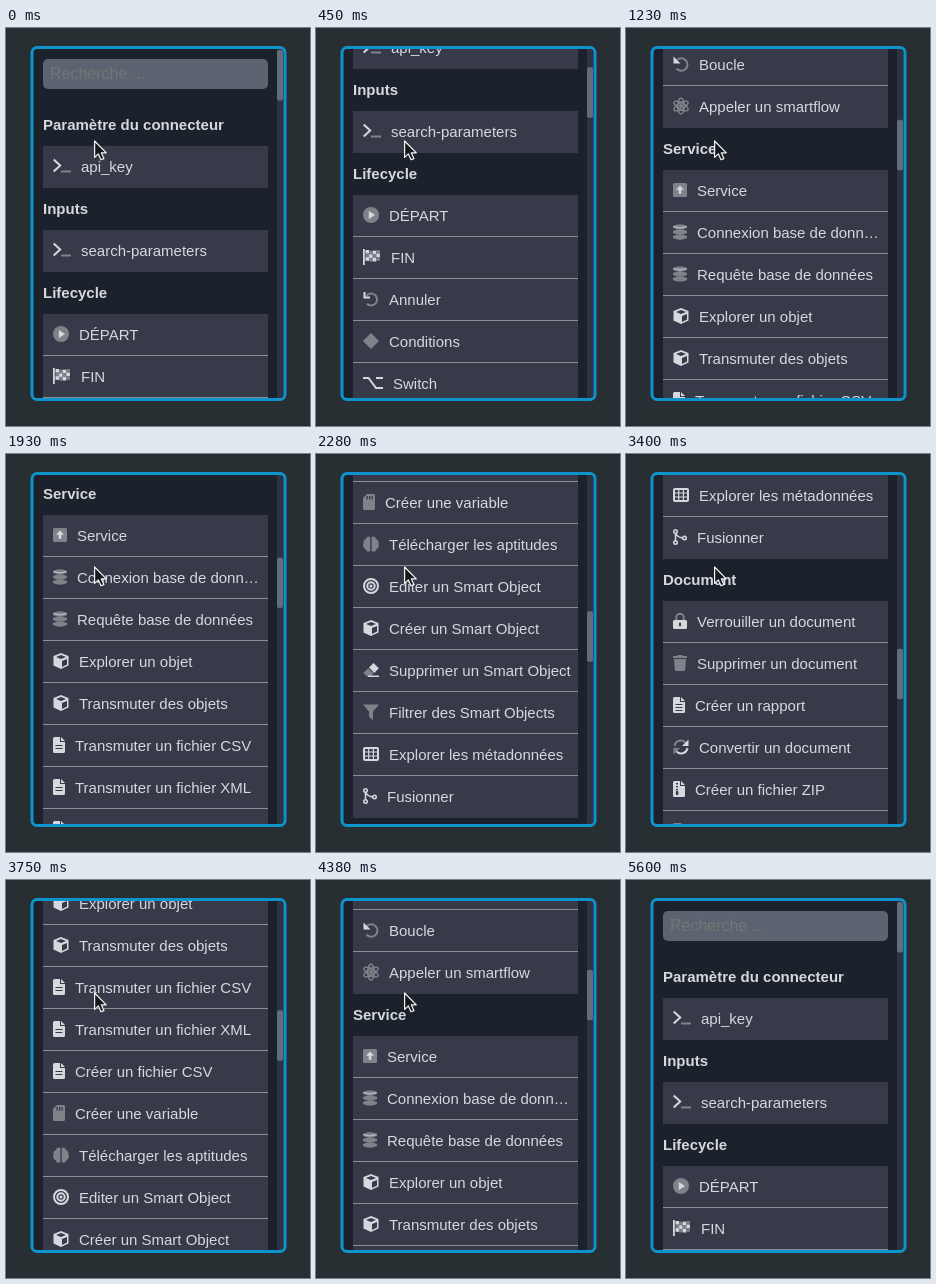
An HTML page for the animation above (6.81 s loop, 304x398 px).

```html
<!DOCTYPE html>
<html lang="fr">
<head>
<meta charset="utf-8">
<style>
html, body { margin: 0; width: 100%; height: 100%; overflow: hidden; background: #272f32; }
svg { display: block; width: 304px; height: 398px; }
text { font: 15px "Liberation Sans", Arial, sans-serif; fill: #d6d8dd; white-space: pre; }
.head { font-weight: bold; }
.hint { font-size: 16px; fill: #757575; }
.l { fill: #d6d8dd; }
.g { fill: #80828a; }
.d { fill: #383a49; }
.sl, .sg { fill: none; stroke: #d6d8dd; stroke-width: 2; }
.sg { stroke: #80828a; }
</style>
</head>
<body>
<svg viewBox="0 0 304 398">
  <defs><clipPath id="view"><rect x="28" y="21" width="249" height="349" rx="3"/></clipPath></defs>
  <rect width="304" height="398" fill="#272f32"/>
  <rect x="26" y="19.5" width="253" height="352" rx="5" fill="#1b222c"/>
  <g clip-path="url(#view)">
    <g id="list">
      <rect x="37" y="31" width="225" height="30" rx="5" fill="#5b6470"/>
      <text class="hint" x="44" y="51">Recherche ...</text>
      <rect id="caret" x="44" y="37" width="1" height="17" fill="#d6d8dd"/>
    </g>
    <rect x="271" y="21" width="6" height="349" fill="#2e3341"/>
    <rect id="thumb" x="271" y="22" width="6" height="50.5" rx="2" fill="#646c7b"/>
  </g>
  <rect x="26" y="19.5" width="253" height="352" rx="5" fill="none" stroke="#0f93cc" stroke-width="3"/>
  <path id="mouse" d="M88.6 113v16.4l3.8-3.5 2.6 5.9 2.9-1.2-2.6-5.8h5z" fill="#15181d" stroke="#f4f4f4" stroke-width="1.2" stroke-linejoin="round"/>
</svg>
<script>
const LOOP = 6810, PITCH = 42, TOP = 97;
const path = (cls, d, extra = '') => `<path class="${cls}" d="${d}" ${extra}/>`;
const circle = (cls, x, y, r) => `<circle class="${cls}" cx="${x}" cy="${y}" r="${r}"/>`;
const box = (cls, x, y, w, h, r = 0) => `<rect class="${cls}" x="${x}" y="${y}" width="${w}" height="${h}" rx="${r}"/>`;

const page = path('l', 'M1.5-8H7v5h5V6.500q0 1.500-1.500 1.500h-9Q0 8 0 6.500v-13Q0-8 1.500-8zM8-8l4 4H8z');
const checks = () => {
  let s = '';
  for (let i = 0; i < 12; i++) {
    const c = i % 4, r = (i / 4) | 0;
    s += box((c + r) % 2 ? 'g' : 'l', 2.5 + c * 3.6, -7 + r * 3.6 + (c % 3 ? 0.7 : 0), 3.6, 3.6);
  }
  return s;
};
const discs = () => [-5, 0, 5].map(y =>
  path('g', `M0 ${y - 1}q7-3.500 14 0v2q-7 3.500-14 0z`)).join('') + path('sl', 'M.5-5.500q6.500 3 13 0', 'style="stroke-width:.8"');
const orbits = () => [0, 60, 120].map(a =>
  `<ellipse class="sg" cx="8" rx="8" ry="3.2" style="stroke-width:1.5" transform="rotate(${a + 30} 8 0)"/>`).join('');

// Each icon is drawn from x = 0, centred on y = 0.
const icons = {
  prompt: path('sl', 'M.7-6.500l6.500 6-6.500 6') + path('sg', 'M8 5.500h10'),
  play: circle('g', 8, 0, 8) + path('l', 'M5.800-4L12 0 5.800 4z'),
  flag: box('l', 0, -8, 1.8, 16) + checks(),
  undo: path('sg', 'M3.500-3.500A6 6 0 1 1 4 4.800') + path('sl', 'M1.500-7v5.500H7'),
  diamond: path('g', 'M8-8l8 8-8 8-8-8z'),
  option: path('sl', 'M0-5h5.500l7.500 10h7M13-5h7'),
  loop: path('sg', 'M4-4A6.200 6.200 0 1 1 3.500 4.500') + path('l', 'M.5-7.500v7h7z'),
  atom: orbits() + circle('g', 8, 0, 2),
  up: box('g', 0, -7, 14, 14, 1.5) + path('l', 'M7-4.500l4 4.200H8.300v4H5.700v-4H3z'),
  base: discs(),
  cube: path('l', 'M8-8l7.500 3v9.500L8 8 .5 4.500V-5z') + path('d', 'M8-6l5 2-5 2-5-2zM9 0l5-2v5.500L9 6z'),
  csv: page + box('d', 2.5, 0, 7, 1) + box('d', 2.5, 3, 7, 1),
  card: path('g', 'M4-8h6.500Q12-8 12-6.500v13Q12 8 10.500 8h-9Q0 8 0 6.500V-4z') +
    [3.5, 6, 8.5].map(x => box('d', x, -6, 1.3, 3.5)).join(''),
  brain: path('g', 'M7.300-7v14Q4 9 2.800 5.500-1 3 .6-1 0-4 3-5 4-8.500 7.300-7zM8.700-7v14q3.300 2 4.500-1.500Q17 3 15.400-1 16-4 13-5 12-8.500 8.700-7z'),
  target: circle('sl', 8, 0, 7) + circle('sl', 8, 0, 3.7) + circle('l', 8, 0, 1.5),
  eraser: path('l', 'M6-2.500L10.500-7l5.300 5.300L11.300 3z') + path('g', 'M5.300-1.800l5.300 5.400L7.500 6.500H4L.3 2.800z') + box('l', 5, 5.5, 11, 1.5),
  funnel: path('g', 'M0-7.500h16L10-.5V8L6 5V-.5z'),
  grid: box('sl', 1, -6, 14, 12, 1) + path('sl', 'M1-2h14M1 2h14M5.700-6V6M10.400-6V6', 'style="stroke-width:1.2"'),
  merge: path('sl', 'M2.500-5V5M2.500-4q2 5 9 5', 'style="stroke-width:1.5"') +
    circle('l', 2.5, -5.5, 2.5) + circle('l', 2.5, 5.5, 2.5) + circle('l', 11.5, 1, 2.5) +
    circle('d', 2.5, -5.5, 1) + circle('d', 2.5, 5.5, 1) + circle('d', 11.5, 1, 1),
  lock: path('sg', 'M3.300-.5v-3a3.700 3.700 0 0 1 7.400 0v3') + box('l', 0, -1, 14, 9, 1.5) + box('d', 6, 1.5, 2, 4, 1),
  bin: path('g', 'M0-7h4l1-1h4l1 1h4v2H0zM1-4h12l-.8 10.500Q12 8 10.600 8H3.400Q2 8 1.800 6.500z'),
  report: page + [-1, 2, 5].map(y => box('d', 2.5, y, 7, 1)).join(''),
  sync: path('sg', 'M1.500-1A6.500 6.500 0 0 1 13-4') + path('sl', 'M14.500 1A6.500 6.500 0 0 1 3 4') +
    path('l', 'M15.500-7.500v6.500H9z') + path('g', 'M.5 7.500V1H7z'),
  zip: page + [-6, -3, 0].map(y => box('d', 3, y, 2, 1.4)).join('') + box('d', 2.8, 2, 2.6, 4, 1),
  sheet: path('g', 'M1.500-8H8l4 4V6.500Q12 8 10.500 8h-9Q0 8 0 6.500v-13Q0-8 1.500-8z')
};

// Headings are plain strings, items are [icon, label, text x].
const rows = [
  'Paramètre du connecteur', ['prompt', 'api_key', 75],
  'Inputs', ['prompt', 'search-parameters', 75],
  'Lifecycle', ['play', 'DÉPART', 73], ['flag', 'FIN', 75], ['undo', 'Annuler', 73],
  ['diamond', 'Conditions', 73], ['option', 'Switch', 77], ['loop', 'Boucle', 73],
  ['atom', 'Appeler un smartflow', 73],
  'Service', ['up', 'Service', 71], ['base', 'Connexion base de donn…', 71],
  ['base', 'Requête base de données', 71], ['cube', 'Explorer un objet', 73],
  ['cube', 'Transmuter des objets', 73], ['csv', 'Transmuter un fichier CSV', 69],
  ['csv', 'Transmuter un fichier XML', 69], ['csv', 'Créer un fichier CSV', 69],
  ['card', 'Créer une variable', 69], ['brain', 'Télécharger les aptitudes', 73],
  ['target', 'Editer un Smart Object', 73], ['cube', 'Créer un Smart Object', 73],
  ['eraser', 'Supprimer un Smart Object', 73], ['funnel', 'Filtrer des Smart Objects', 73],
  ['grid', 'Explorer les métadonnées', 73], ['merge', 'Fusionner', 71],
  'Document', ['lock', 'Verrouiller un document', 71], ['bin', 'Supprimer un document', 71],
  ['report', 'Créer un rapport', 69], ['sync', 'Convertir un document', 73],
  ['zip', 'Créer un fichier ZIP', 69], ['sheet', 'Extraire un document', 69]
];

const drawRow = (row, i) => {
  const y = TOP + i * PITCH;
  if (typeof row === 'string') return `<text class="head" x="37" y="${y + 5}">${row}</text>`;
  const [icon, label, x] = row;
  const line = Array.isArray(rows[i + 1])
    ? `<rect x="37" y="${y + 20}" width="225" height="1" fill="#8b8e98"/>` : '';
  return `<rect class="d" x="37" y="${y - 21}" width="225" height="42"/>${line}` +
    `<g transform="translate(47 ${y - 1})">${icons[icon]}</g><text x="${x}" y="${y + 5}">${label}</text>`;
};

const $ = id => document.getElementById(id);
const list = $('list'), thumb = $('thumb'), caret = $('caret'), mouse = $('mouse');
list.insertAdjacentHTML('beforeend', rows.map(drawRow).join(''));

// Wheel bursts: start, end, first offset, final offset.
const bursts = [
  [280, 450, 8, 119], [680, 1230, 130, 480], [1800, 2450, 491, 1080], [2500, 2650, 1088, 1200],
  [3400, 3950, 1189, 480], [4380, 4650, 466, 240], [4880, 5200, 229, 0]
];

// Steady speed with a short ramp at either end.
function glide(u, a = 0.2, b = 0.083) {
  const v = 1 / (1 - a / 2 - b / 2);
  if (u < a) return v * u * u / (2 * a);
  if (u > 1 - b) return 1 - v * (1 - u) * (1 - u) / (2 * b);
  return v * (u - a / 2);
}

function offsetAt(t) {
  let s = 0;
  for (const [t0, t1, from, to] of bursts) {
    if (t < t0) break;
    s = from + (to - from) * glide(Math.min(1, (t - t0) / (t1 - t0)));
  }
  return Math.round(s);
}

const show = (el, on) => el.setAttribute('visibility', on ? 'visible' : 'hidden');

function render(t) {
  const s = offsetAt(t);
  list.setAttribute('transform', `translate(0 ${-s})`);
  thumb.setAttribute('y', 22 + s / 6.88);
  show(caret, t >= 5200 && t < 5600);
  show(mouse, t < 5200);
}

const begin = performance.now();
function tick() {
  render((performance.now() - begin) % LOOP);
  requestAnimationFrame(tick);
}
render(0);
requestAnimationFrame(tick);
</script>
</body>
</html>
```
